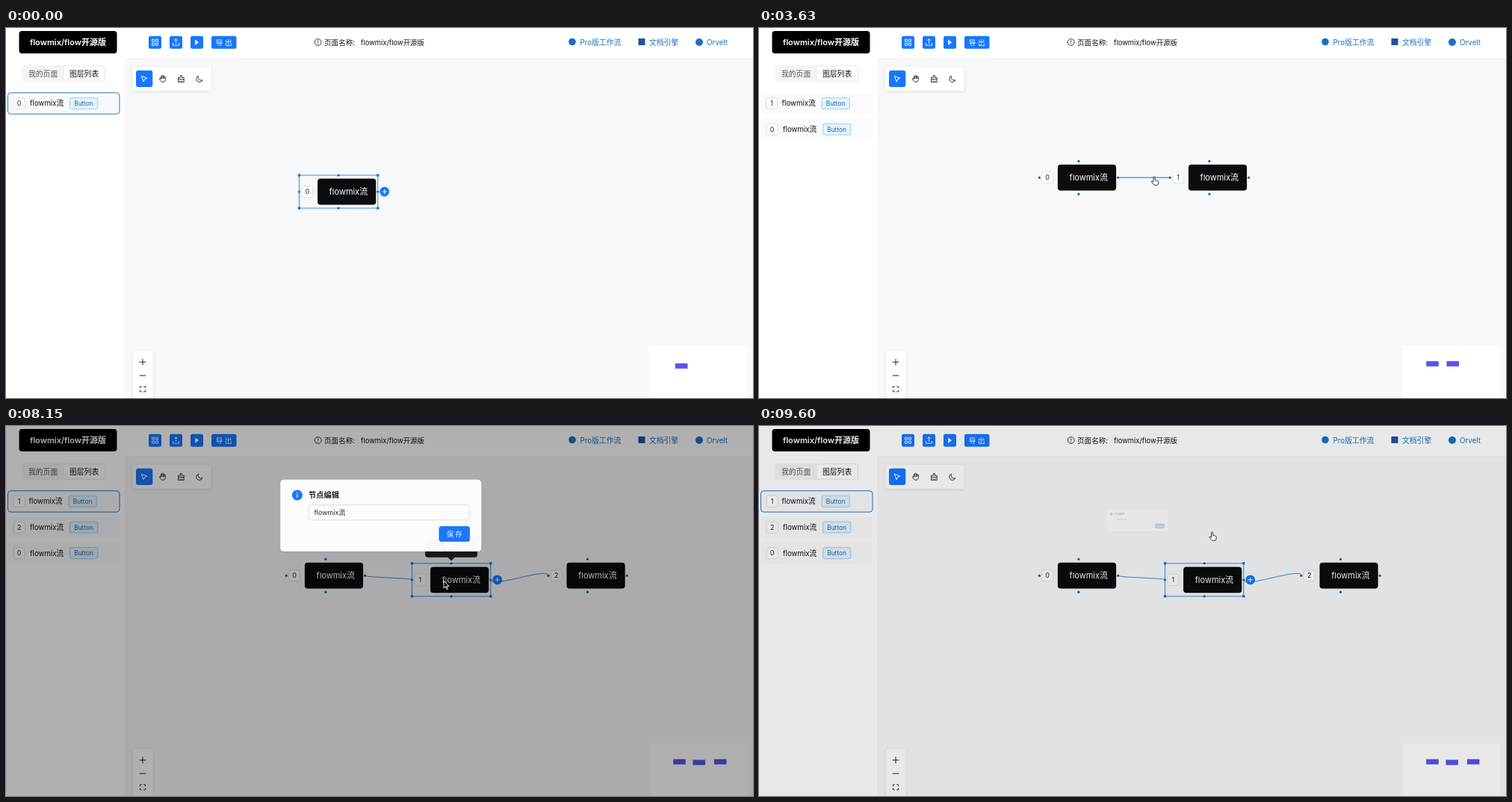
Recreate the animation shown at these times as an HTML page. Size 1000 by 495 pixels, loop 9720 ms.

```html
<!DOCTYPE html>
<html lang="zh-CN">
<head>
<meta charset="utf-8">
<title>flowmix/flow</title>
<style>
html, body { margin: 0; width: 100%; height: 100%; overflow: hidden; background: #fff; }
svg { display: block; width: 100vw; height: 100vh; }
text { font-family: Inter, "Noto Sans CJK SC", "Noto Sans CJK", "Noto Sans", sans-serif; white-space: pre; }
</style>
</head>
<body>
<svg viewBox="0 0 1000 495" xmlns="http://www.w3.org/2000/svg">
  <defs>
    <filter id="soft" x="-20%" y="-20%" width="140%" height="150%">
      <feDropShadow dx="0" dy="1" stdDeviation="2" flood-opacity=".1"/>
    </filter>
  </defs>
  <g id="back"></g>
  <g id="live"></g>
</svg>
<script>
const LOOP = 9720, STEP = 120;
const BLUE = '#1677ff', LINK = '#1c6fc4';
// Bursts of steps: [start, count]; the picture rests between them.
const BURSTS = [[0, 1], [250, 9], [1330, 7], [2300, 5], [3030, 6], [4000, 2], [4620, 2],
  [5360, 3], [5970, 4], [6580, 4], [7310, 9], [8390, 3], [8880, 7]];
const ADD_1 = 1810, ADD_2 = 6210, OPEN = 8030, CLOSE = 9480;

// Tracks: [time, x, y]
const NODE_0 = [[610, 392.5, 219], [1090, 375.3, 200.2]];
const NODE_1 = [[7190, 550.3, 200.2], [7430, 550.3, 180], [7550, 549, 182], [7790, 543.5, 205.8]];
const NODE_2 = [[0, 725.9, 200.2]];
const CURSOR = [[250, 640, 320], [490, 449, 221], [610, 449, 221], [1090, 432, 202], [1330, 440, 202],
  [1570, 488, 198], [2050, 488, 198], [2300, 492, 198], [2540, 601, 195], [2780, 601, 195],
  [3030, 596, 198], [3630, 529, 199], [4000, 520, 199], [4120, 511, 198], [4620, 512, 198],
  [4740, 517, 198], [5360, 520, 201], [5600, 541, 199], [5970, 590, 198], [6210, 663, 198],
  [6330, 663, 198], [6940, 592, 198], [7190, 592, 198], [7430, 592, 178], [7550, 591, 181],
  [7790, 586, 207], [8270, 586, 207], [8630, 606.5, 142]];
const HAND = [[1570, 2300], [3510, 5700], [6210, 6400], [8630, LOOP]];
// Tooltips: [node, shown, hidden]
const TIPS = [[0, 610, 2400], [1, 2600, 3030], [1, 5970, 8390]];

const clamp = v => Math.max(0, Math.min(1, v));
const within = (t, [a, b]) => t >= a && t < b;

function at(track, t) {
  const i = track.findIndex(k => k[0] > t);
  if (i === 0) return track[0].slice(1);
  if (i < 0) return track[track.length - 1].slice(1);
  const [t0, x0, y0] = track[i - 1], [t1, x1, y1] = track[i];
  const p = (t - t0) / (t1 - t0);
  return [x0 + (x1 - x0) * p, y0 + (y1 - y0) * p];
}

function snap(t) {
  const [start, n] = BURSTS.filter(b => b[0] <= t).pop();
  return start + STEP * Math.min(n - 1, Math.floor((t - start) / STEP));
}

const rect = (x, y, w, h, r, fill, extra = '') =>
  `<rect x="${x}" y="${y}" width="${w}" height="${h}" rx="${r}" fill="${fill}" ${extra}/>`;
const circle = (x, y, r, fill, extra = '') => `<circle cx="${x}" cy="${y}" r="${r}" fill="${fill}" ${extra}/>`;
const text = (x, y, size, fill, s, extra = '') =>
  `<text x="${x}" y="${y}" font-size="${size}" fill="${fill}" ${extra}>${s}</text>`;
const line = (d, color, w = 1, extra = '') =>
  `<path d="${d}" fill="none" stroke="${color}" stroke-width="${w}" ${extra}/>`;
const MID = 'text-anchor="middle"';
const BOLD = 'font-weight="600"';
const SOFT = 'filter="url(#soft)"';

function backdrop() {
  const ink = '#222';
  return rect(0, 0, 1000, 495, 0, '#f7f8fa') +
    rect(0, 0, 1000, 41, 0, '#fff') + rect(0, 41, 159, 454, 0, '#fff') +
    line('M159 41.3H1000', '#eeeff1') + line('M159.5 41V495', '#f1f2f4') +
    // header
    rect(17.5, 4, 131, 30, 4, '#000') +
    text(83, 23, 11, '#fff', 'flowmix/flow开源版', `${MID} ${BOLD}`) +
    [191, 219, 247].map(x => rect(x, 10.7, 17, 17, 2.5, BLUE)).join('') +
    rect(275, 10.7, 33.5, 17, 2.5, BLUE) +
    line('M195.5 15.2h3v3h-3zM200.5 15.2h3v3h-3zM195.5 20.2h3v3h-3zM200.5 20.2h3v3h-3z', '#fff', .9) +
    line('M223.5 20v3.2h8V20M227.5 21v-6M225.2 17l2.3-2.3 2.3 2.3', '#fff', .9) +
    '<path d="M253.2 15.5v7.4l4.8-3.7z" fill="#fff"/>' +
    text(291.7, 22.7, 9.6, '#fff', '导 出', MID) +
    circle(417.7, 19, 4.4, 'none', `stroke="${ink}" stroke-width=".9"`) +
    line('M417.7 16.3v3.2M417.7 20.6v1.1', ink, .9) +
    text(426, 22.6, 9.6, '#111', '页面名称:') +
    text(475, 22.6, 9.4, '#111', 'flowmix/flow开源版') +
    circle(758, 18.5, 4.8, LINK) + text(768.5, 22.5, 9.8, LINK, 'Pro版工作流') +
    rect(846.5, 14, 9, 9, 0, '#24519c') + text(861, 22.5, 9.8, LINK, '文档引擎') +
    circle(928, 19, 5, LINK) + text(938, 22.5, 9.8, LINK, 'Orvelt') +
    // sidebar tabs
    rect(21.5, 50, 111.5, 22, 3, '#f4f4f5') +
    rect(77, 51, 55, 20, 2.5, '#fff', 'stroke="#e9e9eb" stroke-width=".8"') +
    text(30, 64.6, 9.8, '#555', '我的页面') + text(85, 64.6, 9.8, '#111', '图层列表') +
    // toolbar
    rect(169.5, 52, 105, 32, 3, '#fff', SOFT) + rect(174, 56.8, 22.3, 22.3, 3, BLUE) +
    line('M181.3 64.2l7.6 2.9-3.3 1.4-1.4 3.4z', '#fff', 1, 'stroke-linejoin="round"') +
    line('M206.6 70.3l-1.2-2.3q.4-1.2 1.5-.2l.5.6v-3.9q.8-1.2 1.4 0v-.7q.8-1.2 1.5 0v.7q.8-1.1 1.5 0v1q.8-1 1.5 0v4q-.2 2.8-3.2 2.8-2.4.1-3.5-2zM208.8 64.5V68M210.3 64.5V68M211.8 65V68', ink, .9) +
    line('M233.4 63.6h2v2.8h2.9v2.3h-7.8v-2.3h2.9zM231 68.7l-.6 3.6h8l-.6-3.6M233 72v-1.5M235.6 72v-1.5', ink, .9) +
    line('M257.6 64.2a4.2 4.2 0 1 0 5.3 5.3 3.9 3.9 0 0 1-5.3-5.3z', ink, .9) +
    // zoom
    rect(170, 432.5, 26.5, 70, 3, '#fff', SOFT) +
    line('M178.7 447h8.6M183 442.7v8.6M178.7 465h8.6', ink, 1) +
    line('M179.5 482v-2.3h2.3M184.2 479.7h2.3v2.3M186.5 484.3v2.4h-2.3M181.8 486.7h-2.3v-2.4', ink, .9) +
    rect(861.5, 425, 130.5, 70, 0, '#fff');
}

const badge = (x, y, n, w = 15) =>
  rect(x - w / 2, y - 7.5, w, 15, 2.5, '#fff', 'stroke="#d9d9d9" stroke-width=".8"') +
  text(x, y + 3.2, 9, '#222', n, MID);

function row(i, n, active) {
  const y = 100.9 + i * 34.6, dx = active || n !== 1 ? 1 : 0, tx = n === 1 ? 84 : 85.5;
  return rect(2.5, y - 14.2, 149.5, 28.4, 4, active ? '#f7f9fc' : '#f9fafb',
      active ? 'stroke="#2d76c8" stroke-width="1"' : '') +
    badge(17 + dx * .7, y, n) +
    text(n === 1 ? 30.5 : 32, y + 3.5, 9.7, '#111', 'flowmix流') +
    rect(tx, y - 7.5, 37.3, 15, 2, '#e4f2fd', 'stroke="#8fc4ee" stroke-width=".8"') +
    text(tx + 18.6, y + 3.1, 8.4, '#2468a8', 'Button', MID);
}

function node([x, y], n, active) {
  const l = x, r = x + 105.3, m = x + 52.6, top = y - 22, low = y + 22;
  let s = badge(x + 10.9, y, n) + rect(x + 24.6, y - 17.4, 78.2, 34.8, 4, '#0b0c0e') +
    text(x + 40.3, y + 4, 11, '#fff', 'flowmix流');
  if (active) {
    s += rect(l, top, 105.3, 44, 0, 'none', 'stroke="#2f8df0" stroke-width="1"') +
      [[l, top], [r, top], [l, low], [r, low]].map(([a, b]) => rect(a - 1.7, b - 1.7, 3.4, 3.4, .5, '#1f78d8')).join('');
  }
  s += [[l, y], [r, y], [m, top], [m, low]].map(([a, b]) => circle(a, b, 1.6, '#1f669c')).join('');
  if (active) {
    s += circle(x + 114.2, y, 6.4, BLUE) +
      line(`M${x + 111.2} ${y}h6M${x + 114.2} ${y - 3}v6`, '#fff', 1.1);
  }
  return s;
}

function edge([x0, y0], [x1, y1], w) {
  const a = x0 + 105.3, dy = y1 - y0;
  const k = dy > 0 ? dy * .45 : dy < 0 ? 8 - dy * .7 : 0;
  return line(`M${a} ${y0}C${a} ${y0 + k} ${x1} ${y1 - k} ${x1} ${y1}`, '#3a8bdc', w);
}

function tip([x, y], show, hide, t) {
  const gone = clamp((t - hide) / 230), on = clamp((t - show) / 200) * (1 - gone);
  if (on <= 0) return '';
  const scale = .8 + .2 * on;
  return `<g opacity="${on}" transform="translate(${x + 52.6} ${y - 26}) scale(${scale})">` +
    rect(-35, -28, 70, 24, 4, '#222') + '<path d="M-5-4.2H5L0 .4z" fill="#222"/>' +
    text(0, -12.4, 9.7, '#fff', '双击节点编辑', MID) + '</g>';
}

function modal(t) {
  if (t < OPEN) return '';
  const inP = clamp((t - OPEN) / 210), out = clamp((t - CLOSE) / 150);
  const dim = .45 * clamp((t - OPEN) / 174) * (1 - out);
  const scale = out ? .2 + .8 * (1 - out) ** 1.4 : .2 + .8 * Math.sqrt(1 - (inP - 1) ** 2);
  const alpha = out ? 1 - out : clamp(inP * 1.7);
  return rect(0, 0, 1000, 495, 0, '#000', `opacity="${dim}"`) +
    `<g opacity="${alpha}" transform="translate(508 129) scale(${scale}) translate(-508 -129)">` +
    rect(355.5, 67, 291.5, 104, 5, '#fff', SOFT) +
    circle(380, 89.5, 7.6, BLUE) + line('M380 88.3v5M380 85.4v1.6', '#fff', 1.4) +
    text(396.5, 93.7, 11.1, '#1d1d1d', '节点编辑', BOLD) +
    rect(396.5, 103.7, 234, 21.8, 4, '#fff', 'stroke="#d9d9d9" stroke-width=".9"') +
    text(404.5, 118.2, 9.7, '#222', 'flowmix流') +
    rect(585.5, 134.5, 45, 22.5, 4, t >= 8630 ? '#0f5fdc' : BLUE) +
    text(608, 149.3, 9.8, '#fff', '保 存', MID) + '</g>';
}

function cursor(t) {
  if (t < 250) return '';
  const [x, y] = at(CURSOR, t);
  const shape = HAND.some(w => within(t, w))
    ? '<path d="M-1 .8a1 1 0 0 1 2 0V4.3l4 1.1q1 .4.8 1.4l-.7 3.6q-.2.8-1 .8H.5q-.6 0-1-.5L-3.6 7q-.4-.8.4-1 .6-.2 1.2.3l1 .8z" fill="#fff" stroke="#222" stroke-width=".9"/>'
    : '<path d="M0 0V10l2.3-2.2 1.7 3.7 1.5-.7-1.6-3.5H7z" fill="#111" stroke="#fff" stroke-width=".9"/>';
  return `<g transform="translate(${x} ${y})">${shape}</g>`;
}

function scene(t) {
  const pos = [NODE_0, NODE_1, NODE_2].map(track => at(track, t));
  const order = t < ADD_1 ? [0] : t < ADD_2 ? [1, 0] : [1, 2, 0];
  const active = t < 2660 ? 0 : t < 3270 ? 1 : t < 5970 ? -1 : 1;
  const width = t < 5360 ? 1.3 : 1;
  let s = order.map((n, i) => row(i, n, n === active)).join('');
  if (t >= ADD_1) s += edge(pos[0], pos[1], width);
  if (t >= ADD_2) s += edge(pos[1], pos[2], width);
  for (const n of order) {
    const [x, y] = pos[n];
    s += node(pos[n], n, n === active) +
      rect(893.2 + (x - 375.3) * .156, 445.7 + (y - 200.2) * .157, 16.6, 7, 0, '#5753ea');
  }
  for (const [n, show, hide] of TIPS) s += tip(pos[n], show, hide, t);
  return s + modal(t) + cursor(t);
}

const live = document.getElementById('live');
document.getElementById('back').innerHTML = backdrop();
const origin = performance.now();
let shown = -1;

function tick() {
  const t = snap((performance.now() - origin) % LOOP);
  if (t !== shown) {
    shown = t;
    live.innerHTML = scene(t);
  }
  requestAnimationFrame(tick);
}
tick();
</script>
</body>
</html>
```
